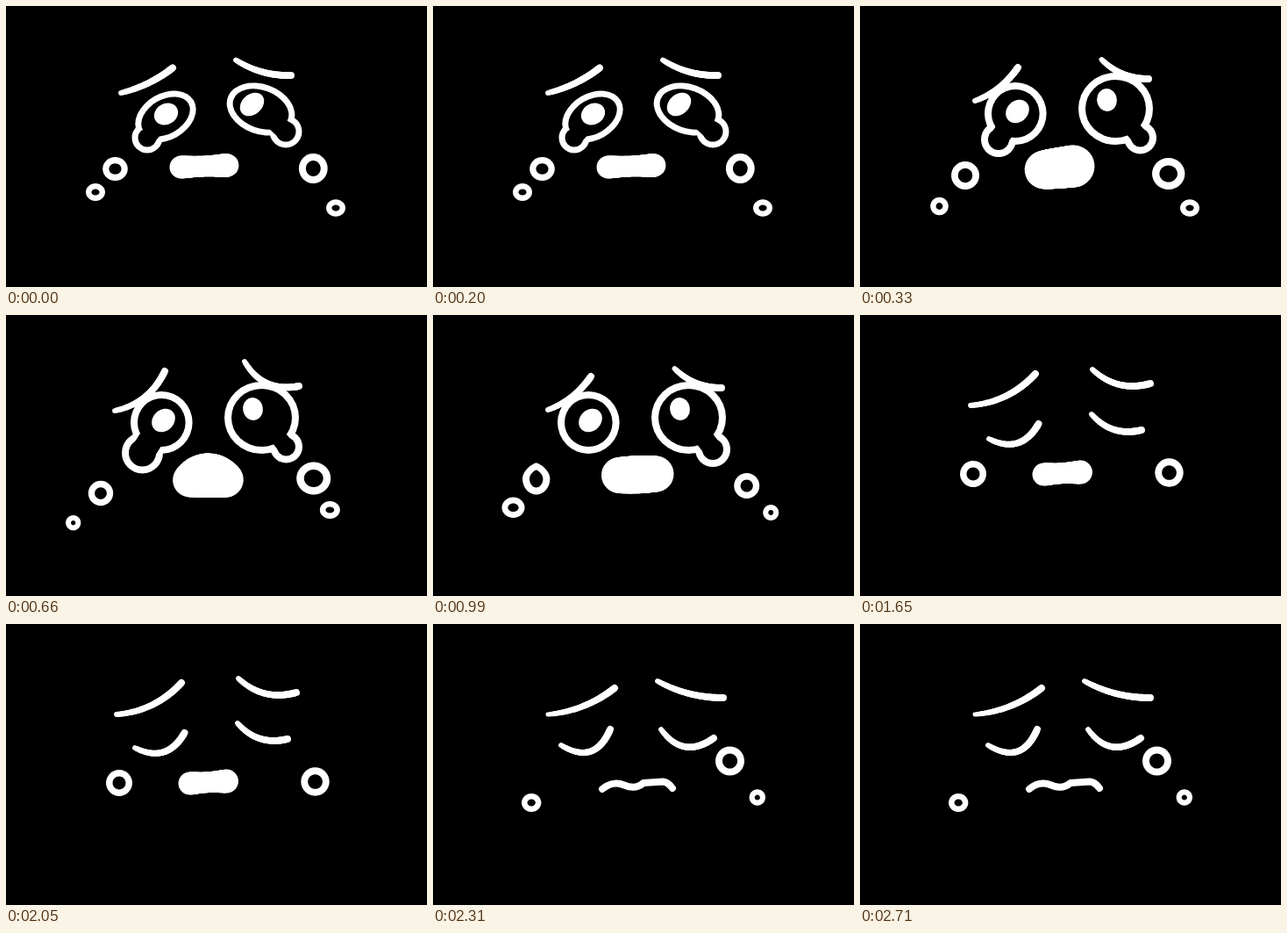
Animation of 480x320 px, one loop 2.97 s. Source, as an HTML page:

```html
<!DOCTYPE html>
<html lang="en">
<head>
<meta charset="utf-8">
<title>Tearful face</title>
<style>
  html, body { margin: 0; width: 100%; height: 100%; overflow: hidden; background: #000; }
  /* Nine equal slots side by side; the strip jumps one slot per beat. */
  #strip { display: block; width: 4320px; height: 320px; animation: run 2970ms steps(9) infinite; }
  @keyframes run { to { transform: translateX(-4320px); } }
  .white { fill: #fff; }
  .black { fill: #000; }
  line, .lips { fill: none; stroke: #fff; stroke-linecap: round; stroke-linejoin: round; }
  .lips { stroke-width: 8; }
  .neck { stroke: #000; }
</style>
</head>
<body>
<svg id="strip" viewBox="0 0 4320 320"></svg>
<script>
const oval = (x, y, rx, ry, turn = 0, tone = 'white') =>
  `<ellipse class="${tone}" cx="${x}" cy="${y}" rx="${rx}" ry="${ry}" transform="rotate(${turn} ${x} ${y})"/>`;

const segment = (x0, y0, x1, y1, w, kind = '') =>
  `<line class="${kind}" x1="${x0}" y1="${y0}" x2="${x1}" y2="${y1}" stroke-width="${w}"/>`;

// Parabolic brush stroke: sag bends it downward, swell thickens its middle.
function arc(x0, y0, x1, y1, sag, w0 = 5.5, w1 = 8, swell = 0) {
  const dx = x1 - x0, dy = y1 - y0, len = Math.hypot(dx, dy), n = 32;
  const at = t => {
    const bend = 4 * t * (1 - t) * sag / len;
    return [x0 + dx * t - dy * bend, y0 + dy * t + dx * bend];
  };
  let out = '';
  for (let i = 0; i < n; i++) {
    const t = (i + 0.5) / n;
    const w = w0 + (w1 - w0) * Math.sqrt(t) + swell * Math.sin(Math.PI * t);
    out += segment(...at(i / n), ...at((i + 1) / n), w);
  }
  return out;
}

// Eye rim that merges with a round tear hanging from it.
function eye({ x, y, rx, ry, turn = 0, wall = 8 }, tear) {
  const rim = inset => oval(x, y, rx - inset, ry - inset, turn, inset ? 'black' : 'white');
  if (!tear) return rim(0) + rim(wall);
  const [tx, ty, r] = tear, hole = r - wall;
  return rim(0) + oval(tx, ty, r, r) + rim(wall) + oval(tx, ty, hole, hole, 0, 'black') +
    segment(tx, ty, (x + tx) / 2, (y + ty) / 2, hole * 1.8, 'neck');
}

// Falling drop; a smaller round handle sharpens its top, and big drops get thicker walls.
function drop(x, y, rx, ry = rx, round = 0.55) {
  const d = `M0-1C${round}-1 1-.55 1 0C1 .55 .55 1 0 1C-.55 1-1 .55-1 0C-1-.55 ${-round}-1 0-1Z`;
  const wall = 3.8 + (rx + ry) / 8;
  const layer = (tone, inset) =>
    `<path class="${tone}" d="${d}" transform="translate(${x} ${y}) scale(${rx - inset} ${ry - inset})"/>`;
  return layer('white', 0) + layer('black', wall);
}

const wideLeft = tear =>
  eye({ x: 177.3, y: 122.5, rx: 35.3, ry: 35.5 }, tear) + oval(179.5, 120, 14.5, 12, -45);
const wideRight = tear =>
  eye({ x: 291.5, y: 117, rx: 42.5, ry: 41 }, tear) + oval(281.5, 107, 11.3, 13, -8);
const raisedBrows = arc(131, 108, 180, 70, 5) + arc(275.5, 61, 329, 83, 6);
const lowDrop = drop(376, 230, 11, 9.8);

const halfOpen =
  eye({ x: 182, y: 126, rx: 37, ry: 26.5, turn: -30, wall: 7 }, [161, 150, 17.5]) +
  oval(182.5, 123, 14.2, 11.8, -30) +
  eye({ x: 290.5, y: 117.5, rx: 40, ry: 28.5, turn: 20, wall: 7 }, [319, 143, 18.5]) +
  oval(280.5, 112, 15.3, 11.5, -42) +
  arc(131, 99, 190, 70.5, 3.5) + arc(262, 61.5, 325, 79, 5) +
  arc(199.5, 183.5, 252, 181.5, 0, 26, 27, -3) +
  drop(124.5, 185.5, 14.3, 13.5) + drop(102, 212, 11, 10) +
  drop(350.3, 185, 16.4, 17) + lowDrop;

const firstSob =
  wideLeft([158, 152, 20]) + wideRight([319.5, 150, 18.5]) + raisedBrows +
  arc(209.5, 186.5, 243.5, 182.5, 0, 43, 48) +
  drop(120, 193, 16) + drop(90.5, 228, 10.3) +
  drop(351.7, 191, 18.7, 18) + lowDrop;

const deepSob =
  wideLeft([155.5, 157, 23.5]) + wideRight([319.5, 150, 18.5]) +
  arc(124, 109, 181, 64, 9) + arc(272, 53, 334, 81, 12) +
  arc(209.5, 188, 250.5, 187.5, -5, 38, 40, 11) +
  drop(108, 203, 14.2) + drop(76.7, 236.7, 8.6) +
  drop(350.7, 186, 19.5, 18.5) + drop(369.3, 222, 11.5, 10);

const leftFallen =
  wideLeft() + wideRight([319, 153, 20]) + raisedBrows +
  arc(212.5, 182.5, 254, 181, 0, 41, 41, 2) +
  drop(117.7, 186.5, 15.7, 18, 0.2) + drop(91.5, 219.3, 13, 11.7) +
  drop(357.7, 194.5, 14.5) + drop(385.2, 225, 9);

const rightFallen =
  wideLeft([158, 153.5, 20]) + wideRight() +
  arc(126, 108, 185, 72, 6) + arc(276, 68, 342, 81, 5) +
  arc(207.5, 182.5, 253.5, 180.5, 0, 41, 42, -4) +
  drop(112, 197.3, 15) + drop(339.3, 167, 14.8) + drop(372.7, 211.7, 13, 12.2);

const shut =
  arc(126, 103, 200, 67, 8) + arc(265, 62, 331, 78, 9.5) +
  arc(147, 141, 203.5, 124, 14) + arc(264, 113, 321, 131, 9) +
  arc(209.5, 181.5, 251.5, 179, 0, 26, 27, -3) +
  drop(129, 181, 15) + drop(352.5, 179.5, 16.2);

const pressed =
  arc(131, 103, 207, 73, 6, 4.5) + arc(256, 65, 331, 84, 5) +
  arc(146, 138, 202, 120, 17) + arc(260, 120, 320, 130, 15) +
  '<path class="lips" d="M193 188Q205 178 218 183.5T240 181L262 179.5Q268 180 273 187"/>' +
  drop(112.2, 203.5, 11.2, 10.5) + drop(338.5, 156, 16.5) + drop(369.8, 197.5, 9.2);

const beats = [halfOpen, firstSob, deepSob, leftFallen, rightFallen, shut, shut, pressed, pressed];
document.getElementById('strip').innerHTML =
  beats.map((pose, i) => `<g transform="translate(${i * 480})">${pose}</g>`).join('');
</script>
</body>
</html>
```
